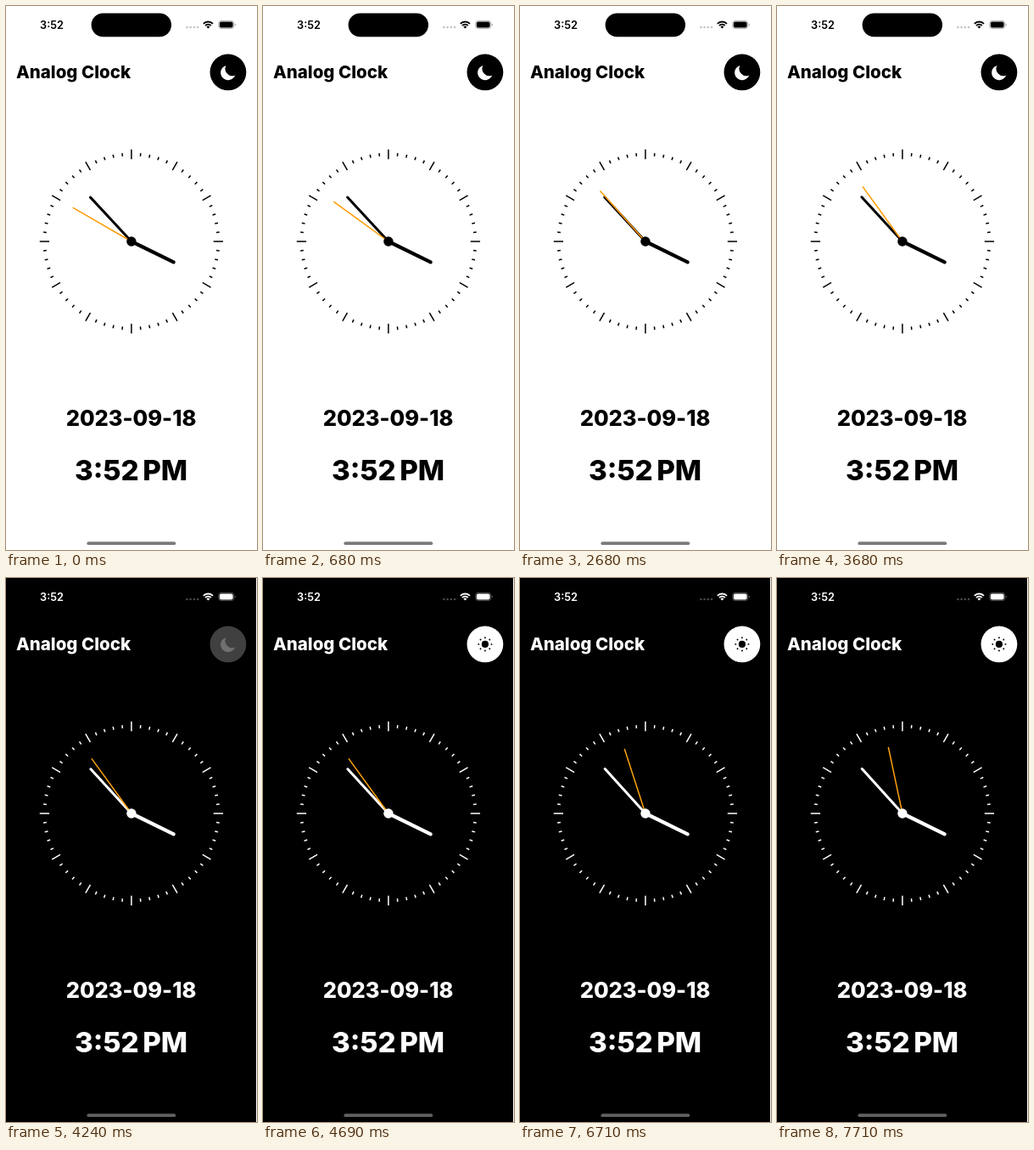
Animation of 296 by 640 pixels, one loop 8.25 s. Source, as an HTML page:

```html
<!DOCTYPE html>
<html lang="en">
<head>
<meta charset="utf-8">
<title>Analog Clock</title>
<style>
  html, body { margin: 0; width: 100%; height: 100%; overflow: hidden; background: #fff; }
  svg { display: block; color: #000; --bg: #fff; --dots: #c4c4c4; --bar: #7a7a7a; --second: #ff9a00; }
  svg.dark { color: #fff; --bg: #000; --dots: #484848; --bar: #606060; --second: #ffa20c; }
  text { font-family: Inter, "Liberation Sans", sans-serif; font-weight: 800; font-feature-settings: "calt" 0; fill: currentColor; }
  .mid { text-anchor: middle; }
  .hand { stroke: currentColor; stroke-linecap: round; }
</style>
</head>
<body>
<svg id="stage" width="296" height="640" viewBox="0 0 296 640">
  <rect width="295" height="640" fill="var(--bg)"/>

  <!-- status bar -->
  <text class="mid" x="54" y="26.6" font-size="12.7" style="font-weight:600">3<tspan dy="-.09em">:</tspan><tspan dy=".09em">52</tspan></text>
  <rect x="100.6" y="8.4" width="94.4" height="27.8" rx="13.9"/>
  <path d="M213.4 25h.01m4.2 0h.01m4.2 0h.01m4.2 0h.01" stroke="var(--dots)" stroke-width="2.7" stroke-linecap="round"/>
  <g transform="translate(238.4 26.4)" fill="none" stroke="currentColor" stroke-width="1.9">
    <path d="M-5.6-5.6A7.9 7.9 0 0 1 5.6-5.6M-3.4-3.4A4.8 4.8 0 0 1 3.4-3.4"/>
    <path d="M0 0L-2-2A2.8 2.8 0 0 1 2-2Z" fill="currentColor" stroke="none"/>
  </g>
  <g fill="currentColor">
    <rect x="250.7" y="17.4" width="18" height="9.2" rx="2.9" fill="none" stroke="currentColor" stroke-width=".75" opacity=".4"/>
    <rect x="251.8" y="18.5" width="15.8" height="7" rx="1.9"/>
    <path d="M269.8 20.5a1.7 1.7 0 0 1 0 3Z" opacity=".45"/>
  </g>

  <!-- header -->
  <text x="12" y="85.4" font-size="20.5">Analog Clock</text>
  <g transform="translate(261.9 77.9)">
    <circle id="button" r="21.4"/>
    <path id="moon" d="M-2.4-8A8.8 8.8 0 1 0 8.3 3.5A8.3 8.3 0 0 1-2.4-8Z" fill="#fff"/>
    <g id="sun"><circle r="4.1"/></g>
  </g>

  <!-- dial -->
  <g transform="translate(147.9 277)">
    <g id="ticks" stroke="currentColor" stroke-width="1.5"/>
    <path class="hand" d="M0 0V-55.4" stroke-width="4.2" transform="rotate(116)"/>
    <path id="minute" class="hand" d="M0 0V-70.9" stroke-width="3"/>
    <path id="second" d="M0 0V-79.9" stroke="var(--second)" stroke-width="1.5"/>
    <circle r="5.7" fill="currentColor"/>
  </g>

  <text class="mid" x="147.5" y="493.7" font-size="25.5">2023-09-18</text>
  <text class="mid" x="147.5" y="558.2" font-size="33.2" word-spacing="-.08em">3<tspan dy="-.09em">:</tspan><tspan dy=".09em">52 PM</tspan></text>
  <rect x="95.4" y="630.3" width="104.8" height="3.8" rx="1.9" fill="var(--bar)"/>
</svg>
<script>
  const LOOP = 8250;
  const SECOND_TIMES = [680, 1680, 2680, 3680, 5710, 5710, 6710, 7710];
  const FADE_TIMES = [4240, 4360, 4470, 4580, 4690];
  const FADE = [0, .25, .48, .7, .88, 1];

  const el = id => document.getElementById(id);
  const passed = (times, t) => times.filter(x => t >= x).length;
  const rotate = (id, deg) => el(id).setAttribute("transform", `rotate(${deg})`);

  function add(parent, name, attrs) {
    const node = document.createElementNS("http://www.w3.org/2000/svg", name);
    for (const key in attrs) node.setAttribute(key, attrs[key]);
    el(parent).append(node);
  }

  for (let i = 0; i < 60; i++) {
    const half = i % 5 ? 1.9 : 5.65;
    add("ticks", "path", { d: `M0 ${-102.5 - half}v${half * 2}`, transform: `rotate(${i * 6})` });
  }
  for (let i = 0; i < 8; i++) {
    add("sun", "circle", { cy: -7.6, r: .95, transform: `rotate(${i * 45})` });
  }

  function draw() {
    const t = performance.now() % LOOP;
    const seconds = 50 + passed(SECOND_TIMES, t);
    rotate("second", seconds * 6);
    rotate("minute", (52 + seconds / 60) * 6);

    const fade = FADE[passed(FADE_TIMES, t)];
    const grey = Math.round(255 * fade);
    el("stage").classList.toggle("dark", fade > 0);
    el("button").style.fill = `rgb(${grey},${grey},${grey})`;
    // the moon is gone before the sun appears
    el("moon").style.opacity = fade ? Math.max(0, .5 - fade) : 1;
    el("sun").style.opacity = Math.max(0, 2 * fade - 1);
    requestAnimationFrame(draw);
  }
  draw();
</script>
</body>
</html>
```
